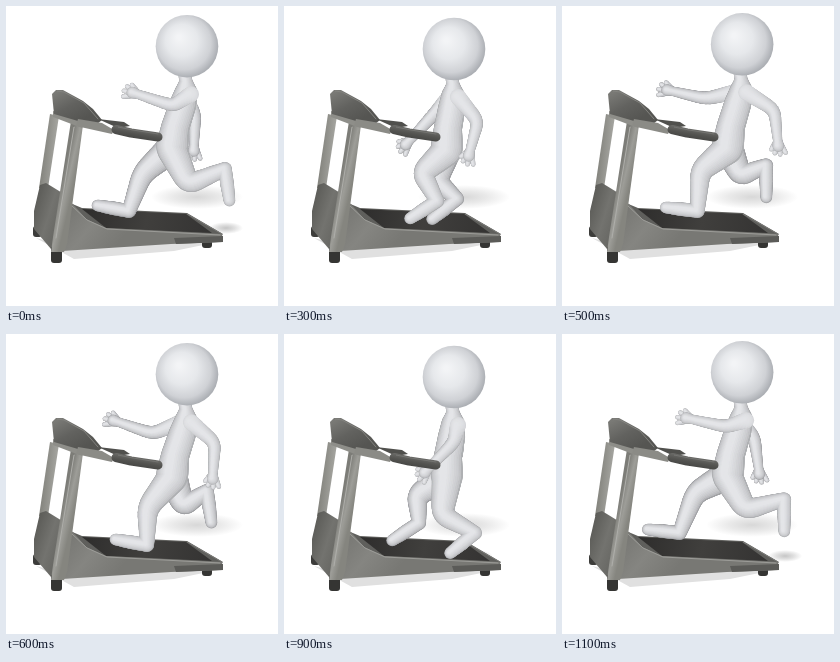
Recreate the animation shown at these times as an HTML page with a canvas. Size 272 px wide and 300 px high, loop 1.2 s.

```html
<!DOCTYPE html>
<html lang="en">
<head>
<meta charset="utf-8">
<title>Treadmill runner</title>
<style>
html, body { margin: 0; width: 100%; height: 100%; overflow: hidden; background: #fff; }
canvas { display: block; width: 272px; height: 300px; }
</style>
</head>
<body>
<canvas id="stage"></canvas>
<script>
const STEP = 100, STEPS = 12, W = 272, H = 300;
const canvas = document.getElementById('stage');
const ctx = canvas.getContext('2d');
const ratio = window.devicePixelRatio || 1;
canvas.width = W * ratio;
canvas.height = H * ratio;
ctx.scale(ratio, ratio);
ctx.lineCap = ctx.lineJoin = 'round';

// Mean plus first and second harmonic of the running cycle.
function wave(t, mean, c1, s1, c2, s2) {
  return mean + c1 * Math.cos(t) + s1 * Math.sin(t) + c2 * Math.cos(2 * t) + s2 * Math.sin(2 * t);
}

// Joints of one body side; the far side runs half a cycle later and sits deeper.
function side(t, isFar) {
  if (isFar) t += Math.PI;
  const joint = (x, y, dx, dy) => [wave(t, ...x) + isFar * dx, wave(t, ...y) + isFar * dy];
  return {
    elbow: joint([185, -21, 12, 3, -2], [108, -4.5, 3.4, -3.7, 9], -20, 0),
    hand: joint([167, -38, 21, 2, -5], [127, -26, 5, -13, 12], -19, 0),
    knee: joint([155, 20.5, -10, 7, -3], [175, 2.4, -7, 1, 6], -5, -6),
    heel: joint([176, 39, -19, 4, -1], [192, -24, -2, -5, 5], -18, -6),
    foot: wave(t, 140, -54, 3, -4, 0) * Math.PI / 180
  };
}

const lerp = (p, q, u) => p.map((v, i) => v + (q[i] - v) * u);
const polar = ([x, y], a, d) => [x + Math.cos(a) * d, y + Math.sin(a) * d];

function dot(x, y, r) {
  ctx.beginPath();
  ctx.arc(x, y, r, 0, Math.PI * 2);
  ctx.fill();
}

// Shaded tapered tubes through points [x, y, radius, edge grey]; tubes of one call melt together.
function solid(...tubes) {
  const dots = [], layers = 10, light = 229;
  for (const points of tubes) {
    for (let i = 1; i < points.length; i++) {
      const a = points[i - 1], b = points[i];
      const n = Math.ceil(Math.hypot(b[0] - a[0], b[1] - a[1]) / 0.8) || 1;
      for (let j = 0; j <= n; j++) dots.push(lerp(a, b, j / n));
    }
  }
  for (let k = 0; k < layers; k++) {
    const f = k / (layers - 1);
    for (const [x, y, r, edge] of dots) {
      const g = Math.round(edge + (light - edge) * Math.sqrt(f));
      ctx.fillStyle = `rgb(${g - 1},${g},${g + 3})`;
      dot(x - r * 0.24 * f, y - r * 0.14 * f, r * (1 - 0.78 * f));
    }
  }
}

// Rounds the joint b between a and c.
function bend(a, b, c) {
  const s = lerp(b, a, 0.24), e = lerp(b, c, 0.24);
  const out = [a];
  for (let u = 0; u <= 1; u += 0.25) out.push(lerp(lerp(s, b, u), lerp(b, e, u), u));
  return [...out, c];
}

function arm(shoulder, { elbow, hand }, edge) {
  const dir = Math.atan2(hand[1] - elbow[1], hand[0] - elbow[0]);
  for (let i = 0; i < 4; i++) {
    const tip = polar(hand, dir - 0.5 + i * 0.42, 14 - i * i * 0.4);
    solid([[...hand, 4, edge], [...tip, 2.2, edge]]);
  }
  solid([
    ...bend([...shoulder, 8, 216], [...elbow, 6.4, edge], [...hand, 4.6, edge]),
    [...polar(hand, dir, 5), 5.8, edge]
  ]);
}

function leg(hip, { knee, heel, foot }, edge) {
  return [
    [[...heel, 6.8, edge], [...polar(heel, foot, 16), 6.8, edge], [...polar(heel, foot, 32), 5.8, edge]],
    bend([...hip, 15, edge], [...knee, 10.5, edge], [...heel, 7, edge])
  ];
}

function shape(fill, ...p) {
  ctx.fillStyle = fill;
  ctx.beginPath();
  for (let i = 0; i < p.length; i += 2) ctx.lineTo(p[i], p[i + 1]);
  ctx.closePath();
  ctx.fill();
}

function line(color, width, ...p) {
  ctx.strokeStyle = color;
  ctx.lineWidth = width;
  ctx.beginPath();
  for (let i = 0; i < p.length; i += 2) ctx.lineTo(p[i], p[i + 1]);
  ctx.stroke();
}

function block(color, x, y, w, h) {
  ctx.fillStyle = color;
  ctx.beginPath();
  ctx.roundRect(x, y, w, h, 3);
  ctx.fill();
}

function fade(x0, y0, x1, y1, ...colors) {
  const g = ctx.createLinearGradient(x0, y0, x1, y1);
  colors.forEach((c, i) => g.addColorStop(i / (colors.length - 1), c));
  return g;
}

function shadow(x, y, rx, ry, alpha) {
  ctx.save();
  ctx.translate(x, y);
  ctx.scale(rx, ry);
  const g = ctx.createRadialGradient(0, 0, 0, 0, 0, 1);
  g.addColorStop(0, `rgba(90,90,90,${alpha})`);
  g.addColorStop(0.5, `rgba(90,90,90,${alpha * 0.55})`);
  g.addColorStop(1, 'rgba(90,90,90,0)');
  ctx.fillStyle = g;
  dot(0, 0, 1);
  ctx.restore();
}

function machine() {
  shape('#e0e0e0', 30, 232, 60, 240, 212, 236, 168, 245, 68, 253);
  // deck
  shape('#5f5f5c', 64, 197, 76, 202, 181, 207, 217, 228, 212, 233, 90, 229);
  shape(fade(80, 204, 200, 230, '#2f2e2d', '#403f3d', '#353433'),
    76, 203, 180, 208, 206, 227, 100, 222);
  line('#7a7a77', 1, 181, 208, 216, 228);
  block('#353533', 196, 233, 10, 9);
  shape(fade(60, 200, 110, 240, '#767672', '#858581', '#787874'),
    61, 196, 67, 198, 80, 213, 100, 222, 216, 228, 217, 236, 165, 238, 56, 245);
  line('#9c9c98', 1, 65, 199, 81, 214, 101, 223, 214, 229);
  shape('#5b5b58', 168, 232, 217, 230, 217, 236, 170, 238);
  // far upright and front cover
  shape(fade(40, 110, 52, 111, '#85857f', '#a3a39e'), 44, 108, 53, 110, 42, 182, 33, 182);
  block('#3c3c3a', 27, 220, 9, 11);
  shape(fade(28, 200, 60, 210, '#5d5d59', '#73736f', '#646460'),
    34, 179, 40, 177, 58, 188, 52, 243, 45, 243, 28, 223, 28, 205);
  // near upright
  block('#353533', 45, 240, 11, 17);
  shape(fade(54, 180, 67, 183, '#7c7c77', '#9d9d98', '#85857f'),
    65, 115, 77, 119, 61, 238, 58, 246, 45, 246, 47, 231);
  line('#aeaeaa', 1, 68, 121, 50, 232);
  shape('#8e8e89', 47, 105, 78, 114, 76, 122, 47, 111);
  // console
  shape(fade(55, 84, 72, 116, '#7a7a76', '#62625f', '#555552'),
    46, 88, 50, 84, 57, 84, 77, 95, 87, 103, 96, 114, 91, 118, 72, 115, 48, 108);
  line('#83837f', 1, 51, 85, 58, 86, 78, 97, 92, 113);
}

function rail() {
  shape('#8b8b86', 72, 113, 96, 117, 108, 124, 106, 128, 70, 120);
  shape('#50504d', 92, 113, 118, 116, 124, 120, 112, 122);
  line(fade(125, 121, 123, 133, '#6d6d6a', '#535350', '#434341'), 9, 110, 123.5, 125, 127, 152, 131);
  line('#747471', 1, 112, 121, 127, 124, 152, 128);
}

function ball(x, y, r) {
  const g = ctx.createRadialGradient(x - 8, y - 9, 2, x - 2, y - 2, r + 2);
  g.addColorStop(0, '#f3f4f6');
  g.addColorStop(0.45, '#e6e8eb');
  g.addColorStop(0.8, '#cfd1d5');
  g.addColorStop(1, '#acafb4');
  ctx.fillStyle = g;
  dot(x, y, r);
}

function draw(step) {
  const t = step / STEPS * Math.PI * 2;
  const near = side(t, false), far = side(t, true);
  const x = wave(t, 175.5, 0, 0, 5.5, -2.2), y = wave(t, 41.6, 0, 0, -1.4, 3);
  const hip = [164 + (x - 177) * 0.3, 141 + (y - 41) * 0.4];
  const edge = 176, farEdge = 162;

  ctx.fillStyle = '#fff';
  ctx.fillRect(0, 0, W, H);
  shadow(x + 10, 191, 46, 12, 0.24);
  shadow(near.heel[0] + 1, 222, 17, 6, 0.35);
  machine();

  arm([x - 4, y + 47], far, farEdge);
  solid(...leg([hip[0] + 1, hip[1] + 1], far, farEdge));
  const torso = [
    [x - 2, y + 29, 6.5, edge],
    [x - 1, y + 36, 6.5, edge],
    [x - 1, y + 47, 11.5, edge],
    [x * 0.7 + hip[0] * 0.3, y + 60, 13.5, edge],
    [x * 0.25 + hip[0] * 0.75, hip[1] - 19, 14, edge],
    [hip[0] + 1, hip[1], 16, edge]
  ];
  solid(torso, ...leg([hip[0] + 1, hip[1] + 3], near, edge));
  arm([x + 4, y + 48], near, edge);
  ball(x, y, 31.3);
  rail();
}

let shown = -1;
const start = performance.now();
function tick(now) {
  const step = Math.floor(Math.max(0, now - start) / STEP) % STEPS;
  if (step !== shown) draw(shown = step);
  requestAnimationFrame(tick);
}
tick(start);
</script>
</body>
</html>
```
